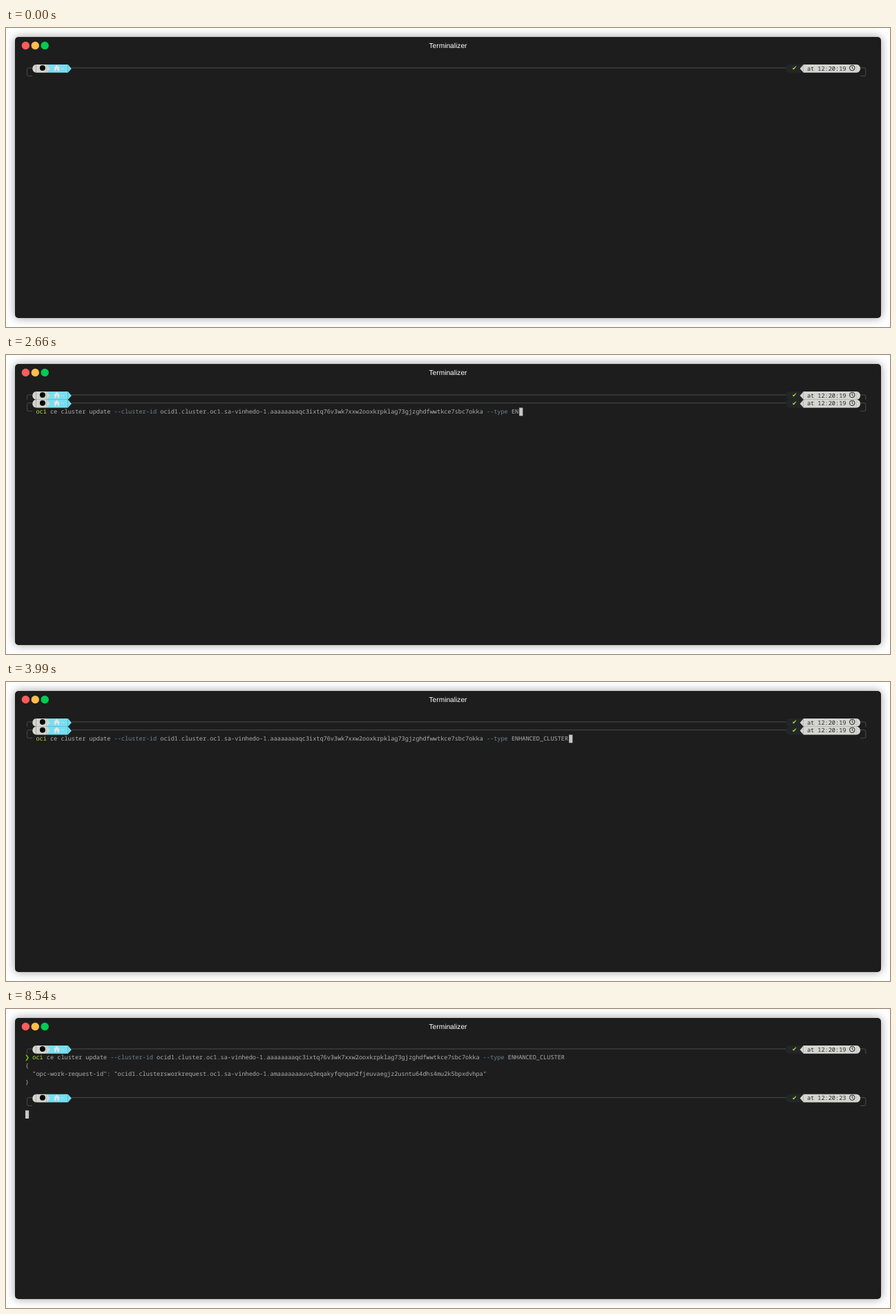
Recreate the animation shown at these times as an HTML page. Size 1280x434 px, loop 9.33 s.

```html
<!DOCTYPE html>
<html lang="en">
<head>
<meta charset="utf-8">
<title>Terminalizer</title>
<style>
  html, body { margin: 0; width: 100%; height: 100%; overflow: hidden; background: #fff; }
  .window {
    position: absolute; left: 13px; top: 13px; width: 1254px; height: 408px;
    border-radius: 5px; background: #1d1d1d; box-shadow: 0 0 13px rgba(0, 0, 0, .4);
  }
  svg { position: absolute; left: 0; top: 0; }
  text {
    font: 8.575px "Noto Sans Mono", "DejaVu Sans Mono", monospace;
    font-variant-ligatures: none; text-rendering: geometricPrecision; white-space: pre;
  }
  .title { font: 10.2px "Liberation Sans", Arial, sans-serif; }
  .sign { font-family: "DejaVu Sans", sans-serif; }
</style>
</head>
<body>
<div class="window"></div>
<svg width="1280" height="434" viewBox="0 0 1280 434">
  <circle cx="28.4" cy="25.5" r="5.7" fill="#ff5c5c"/>
  <circle cx="42.3" cy="25.5" r="5.7" fill="#ffbd4c"/>
  <circle cx="56.2" cy="25.5" r="5.7" fill="#00ca56"/>
  <text class="title" x="640" y="29.3" text-anchor="middle" fill="#fff">Terminalizer</text>
  <g id="screen"></g>
</svg>
<script>
const LOOP = 9330, CELL = 5.145, ROW = 11.78;
const FG = '#afafaf', BLACK = '#232628', WHITE = '#d5d5d0', BLUE = '#75dff2',
      GREEN = '#b3e33b', CYAN = '#708387', CURSOR = '#c7c7c7';
const COMMAND = [
  ['oci', GREEN], [' ce cluster update ', FG], ['--cluster-id', CYAN],
  [' ocid1.cluster.oc1.sa-vinhedo-1.aaaaaaaaqc3ixtq76v3wk7xxw2ooxkrpklag73gjzghdfwwtkce7sbc7okka ', FG],
  ['--type', CYAN], [' ENHANCED_CLUSTER', FG]
];
const LENGTH = 150;
const OUTPUT = [
  '{',
  '  "opc-work-request-id": "ocid1.clustersworkrequest.oc1.sa-vinhedo-1.amaaaaaaauvq3eqakyfqnqan2fjeuvaegjz2usntu64dhs4mu2k5bpxdvhpa"',
  '}'
];
const screen = document.getElementById('screen');

const colX = c => 28 + c * CELL;
const rowY = r => 53 + r * ROW;
const path = (d, fill) => `<path d="${d}" fill="${fill}"/>`;
const line = (d, color = '#585858', width = .8) =>
  `<path d="${d}" fill="none" stroke="${color}" stroke-width="${width}"/>`;
const block = (col, row, cells, color) =>
  `<rect x="${colX(col)}" y="${rowY(row)}" width="${cells * CELL}" height="${ROW}" fill="${color}"/>`;
const cursor = (col, row) => block(col, row, 1, CURSOR);
const text = (col, row, str, color) =>
  `<text x="${colX(col)}" y="${rowY(row) + 8.6}" fill="${color}">${str}</text>`;
const sign = (col, row, str, color) =>
  `<text class="sign" x="${colX(col + .5)}" y="${rowY(row) + 8.3}" fill="${color}" text-anchor="middle">${str}</text>`;

// Rounded end (side -1 left, 1 right) or pointed end of a segment
function cap(col, row, side, color) {
  const x = colX(side < 0 ? col + 1 : col), y = rowY(row);
  return path(`M${x} ${y}a${CELL} ${ROW / 2} 0 0 ${side < 0 ? 0 : 1} 0 ${ROW}z`, color);
}
function arrow(col, row, side, color) {
  const x = colX(side < 0 ? col + 1 : col), y = rowY(row);
  return path(`M${x} ${y}l${side * CELL} ${ROW / 2} ${-side * CELL} ${ROW / 2}z`, color);
}

function prompt(row, time, closed) {
  const y = rowY(row), mid = y + 4.9, end = y + ROW;
  const left = colX(.5), right = colX(236.5);
  let s = line(`M${colX(13)} ${mid}H${colX(214)}`) +
    line(`M${colX(2)} ${mid}H${left + 2}q-2 0 -2 2V${end}`) +
    line(`M${colX(235)} ${mid}H${right - 2}q2 0 2 2V${end}`);
  if (closed) {
    s += line(`M${left} ${end}v2.9q0 2 2 2H${colX(2)}`) +
      line(`M${right} ${end}v2.9q0 2 -2 2H${colX(235)}`);
  }
  const home = colX(9) - .8, clock = colX(232.7);
  return s +
    cap(2, row, -1, WHITE) + block(3, row, 3, WHITE) +
    `<circle cx="52.9" cy="${y + 5}" r="4" fill="#080808"/>` +
    block(6, row, 6, BLUE) + arrow(6, row, 1, WHITE) + arrow(12, row, 1, BLUE) +
    path(`M${home} ${y + .7}l4.8 4.5h-1.3v4h-2.4v-2.8h-2.2v2.8h-2.4v-4h-1.3z`, '#e4e4e4') +
    `<g font-weight="bold">${text(10, row, '~', '#e4e4e4')}</g>` +
    cap(214, row, -1, BLACK) + block(215, row, 4, BLACK) +
    sign(216, row, '✔', GREEN) +
    arrow(218, row, -1, WHITE) + block(219, row, 15, WHITE) + cap(234, row, 1, WHITE) +
    text(220, row, 'at ' + time, BLACK) +
    `<circle cx="${clock}" cy="${y + 5}" r="3.8" fill="none" stroke="${BLACK}"/>` +
    line(`M${clock} ${y + 2.5}v2.8l1.7 1.2`, BLACK, .9);
}

function command(col, row, count) {
  let spans = '';
  for (const [str, color] of COMMAND) {
    spans += `<tspan fill="${color}">${str.slice(0, Math.max(0, count))}</tspan>`;
    count -= str.length;
  }
  return text(col, row, spans, FG);
}

// The pasted command slows down as the line grows
function typed(t) {
  if (t < 1060) return 0;
  const k = Math.floor((t - 1060) / 100);
  if (k <= 6) return Math.round(64 * (k + 1) / 7);
  if (k <= 16) return Math.round(64 + 7.2 * (k - 6));
  return Math.min(LENGTH, Math.round(136 + 1.75 * (k - 16)));
}

function draw(t) {
  const first = '12:20:19';
  if (t < 300) return prompt(0, first, true);
  let s = prompt(0, first, false);
  if (t < 5100) {
    s += prompt(1, first, true);
    if (t < 400) return s;
    const n = typed(t);
    s += t >= 3560 && t < 3990 ? block(3, 2, LENGTH, FG) : command(3, 2, n);
    return s + cursor(3 + n, 2);
  }
  s += sign(0, 1, '❯', '#5fd700') + command(2, 1, LENGTH);
  if (t < 5200) return s + cursor(2 + LENGTH, 1);
  if (t < 6260) return s + cursor(0, 2);
  OUTPUT.forEach((str, i) => s += text(0, 2 + i, str, FG));
  if (t < 6540) return s + cursor(0, 5);
  s += prompt(6, '12:20:23', true);
  return s + (t < 8540 ? cursor(3, 7) : cursor(0, 8));
}

let shown;
function tick() {
  const markup = draw(performance.now() % LOOP);
  if (markup !== shown) screen.innerHTML = shown = markup;
  requestAnimationFrame(tick);
}
tick();
</script>
</body>
</html>
```
